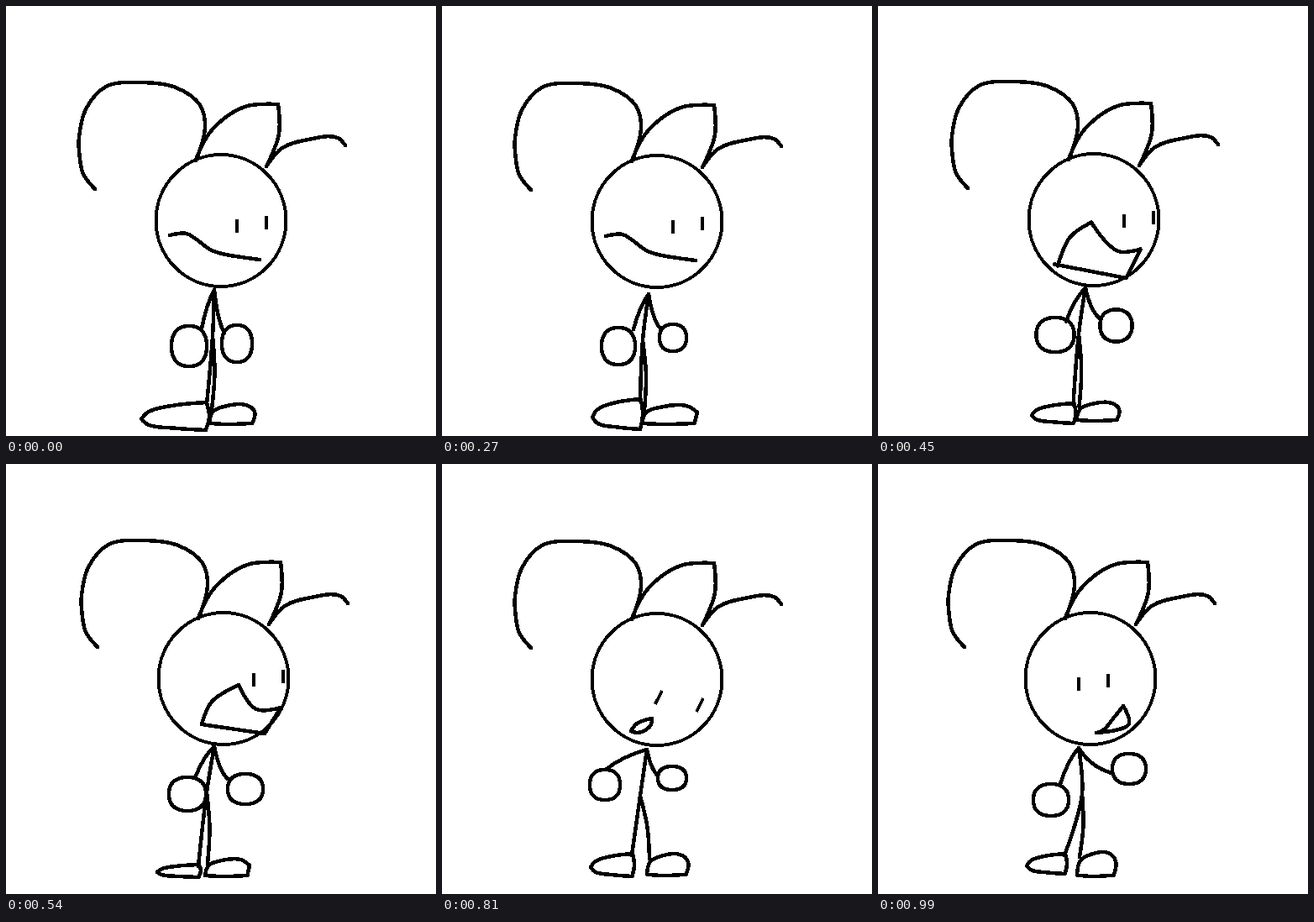
An HTML page for the animation above (1080 ms loop, 512 by 512 pixels).

```html
<!DOCTYPE html>
<html lang="en">
<head>
<meta charset="utf-8">
<title>Talking stick figure</title>
<style>
html, body { margin: 0; width: 100%; height: 100%; overflow: hidden; background: #fff; }
svg { display: block; width: 100vw; height: 100vh; }
</style>
</head>
<body>
<svg viewBox="0 0 512 512" fill="none" stroke="#000" stroke-width="4.5"
  stroke-linecap="round" stroke-linejoin="round" shape-rendering="crispEdges">
  <g id="head">
    <ellipse cx="256" cy="255.5" rx="77.5" ry="78.5" stroke-width="4"/>
    <path id="hair"/>
    <path id="eyes" stroke-width="4" stroke-linecap="butt"/>
    <path id="mouth"/>
  </g>
  <path id="body"/>
</svg>
<script>
const STEP = 90, STEPS = 12;
const HEAD = [[0, 0], [0, 0], [0, 1], [0, 1], [0, -3], [1, -1],
              [3, 0], [1, 0], [0, 0], [0, 1], [-6, 0], [-3, 0]];

const HAIR = [
  [106, 218, 92, 200, 87, 172, 87, 156, 95, 123, 119, 96, 158, 91, 202, 97, 231, 118, 237, 145, 226, 184],
  [226, 183, 244, 149, 284, 120, 324, 117, 325, 152, 310, 191],
  [310, 191, 329, 169, 360, 159, 395, 157, 404, 166]
];
const LIDS = [[192, 245, 217, 260, 244, 256, 252, 230], [291, 211, 295, 236, 318, 243, 328, 218]];

// Foot outlines inside a unit box
const FOOT_L = [0, .6, .1, .35, .45, .12, .96, 0, 1, .5, .95, 1, .5, .93, .1, .8];
const FOOT_R = [.08, .35, .3, .1, .8, 0, 1, .35, .95, .95, .4, 1, 0, .95];

const FLAT = [195, 273, 215, 271, 224, 276, 245, 291, 262, 296, 280, 299, 302, 302];

// spine: neck x, y, hip x; hands: centre and radii; feet: left, top, right, bottom
// eyes (in the head): left eye, offset of the right eye, lean
const POSES = [
  { step: 0, spine: [248, 338, 246], wristL: [233, 384], wristR: [260, 389],
    handL: [218, 405, 21, 24], handR: [275, 402, 18, 22],
    footL: [161, 472, 242, 505], footR: [242, 475, 296, 498],
    eyes: [275, 262, 35, -4, 0], mouth: FLAT },
  { step: 3, spine: [246, 343, 239], wristL: [228, 385], wristR: [260, 384],
    handL: [210, 405, 20, 22], handR: [275, 395, 16, 16],
    footL: [179, 468, 239, 504], footR: [238, 476, 304, 498],
    eyes: [275, 262, 35, -4, 0], mouth: FLAT },
  { step: 4, shut: true, spine: [246, 335, 239], wristL: [223, 377], wristR: [264, 369],
    handL: [206, 390, 23, 21], handR: [282, 374, 17, 20],
    footL: [186, 469, 239, 502], footR: [236, 474, 284, 497],
    eyes: [292, 257, 35, -4, 0],
    mouth: [196, 311, 213, 270, 232, 254, 275, 294, 299, 291, 284, 329, 188, 307] },
  { step: 6, spine: [248, 336, 239], wristL: [225, 374], wristR: [264, 375],
    handL: [216, 393, 22, 20], handR: [285, 387, 21, 18],
    footL: [180, 477, 232, 492], footR: [237, 471, 290, 491],
    eyes: [292, 257, 35, -4, 0],
    mouth: [230, 310, 242, 283, 274, 263, 295, 292, 324, 290, 305, 321, 230, 310] },
  { step: 7, spine: [245, 342, 239], wristL: [229, 375], wristR: [262, 375],
    handL: [212, 394, 21, 20], handR: [279, 386, 21, 18],
    footL: [173, 472, 230, 493], footR: [237, 469, 284, 490],
    eyes: [290, 257, 35, -4, 0],
    mouth: [228, 304, 237, 281, 263, 268, 281, 283, 315, 301, 303, 324, 228, 304] },
  { step: 9, spine: [244, 340, 236], wristL: [196, 363], wristR: [257, 371],
    handL: [194, 382, 18, 18], handR: [274, 374, 17, 14],
    footL: [177, 464, 229, 491], footR: [244, 465, 293, 490],
    eyes: [258, 277, 49, 9, 4],
    mouth: [225, 317, 232, 308, 250, 302, 249, 309, 242, 316, 233, 319, 225, 317] },
  { step: 11, spine: [239, 338, 243], wristL: [217, 381], wristR: [278, 368],
    handL: [206, 400, 21, 19], handR: [299, 363, 20, 18],
    footL: [177, 464, 225, 488], footR: [237, 463, 283, 491],
    eyes: [242, 262, 35, -4, 0],
    mouth: [263, 320, 271, 317, 283, 303, 295, 288, 302, 309, 298, 313, 263, 320] }
];

const sub = (a, b) => [a[0] - b[0], a[1] - b[1]];
const unit = v => { const l = Math.hypot(...v) || 1; return [v[0] / l, v[1] / l]; };
const lerp = (a, b, k) => a + (b - a) * k;

// Smooth stroke through x, y pairs; sharp turns stay corners
function curve(flat, closed) {
  const n = flat.length / 2;
  const at = i => {
    const m = closed ? (i + n) % n : Math.max(0, Math.min(n - 1, i));
    return [flat[2 * m], flat[2 * m + 1]];
  };
  const tangent = i => {
    const a = unit(sub(at(i), at(i - 1))), b = unit(sub(at(i + 1), at(i)));
    return a[0] * b[0] + a[1] * b[1] < 0.4 ? [0, 0] : unit([a[0] + b[0], a[1] + b[1]]);
  };
  let d = 'M' + at(0);
  for (let i = 0; i < (closed ? n : n - 1); i++) {
    const p = at(i), q = at(i + 1), s = tangent(i), e = tangent(i + 1);
    const h = Math.hypot(...sub(q, p)) / 3;
    d += `C${p[0] + s[0] * h} ${p[1] + s[1] * h} ${q[0] - e[0] * h} ${q[1] - e[1] * h} ${q}`;
  }
  return d + (closed ? 'Z' : '');
}

// Slightly squared ellipse
function hand([cx, cy, rx, ry]) {
  const soft = v => Math.sign(v) * Math.abs(v) ** 0.85;
  const pts = [];
  for (let i = 0; i < 16; i++) {
    const a = (i + 0.5) * Math.PI / 8;
    pts.push(cx + rx * soft(Math.cos(a)), cy + ry * soft(Math.sin(a)));
  }
  return curve(pts, true);
}

const foot = (shape, box) =>
  curve(shape.map((v, i) => lerp(box[i % 2], box[2 + i % 2], v)), true);

const arm = ([x, y], wrist, kx, ky) =>
  `M${x} ${y}Q${lerp(x, wrist[0], kx)} ${lerp(y, wrist[1], ky)} ${wrist}`;

function body({ spine, wristL, wristR, handL, handR, footL, footR }) {
  const [x, y, hipX] = spine, hipY = y + 55;
  const ankleL = [footL[2] - 3, footL[1] + 2];
  const ankleR = [footR[0] + 3, footR[1] + 5];
  const knee = [(hipX + ankleR[0]) / 2 + 3, (hipY + ankleR[1]) / 2];
  return arm(spine, wristL, 0.6, 0.35) + arm(spine, wristR, 0.35, 0.75) +
    curve([x, y, hipX, hipY, ...ankleL]) + curve([hipX, hipY, ...knee, ...ankleR]) +
    hand(handL) + hand(handR) + foot(FOOT_L, footL) + foot(FOOT_R, footR);
}

function eyes([x, y, dx, dy, lean]) {
  const eye = (cx, cy) => `M${cx + lean} ${cy - 8}L${cx - lean} ${cy + 8}`;
  return eye(x, y) + eye(x + dx, y + dy);
}

function poseAt(step) {
  const a = POSES.findLast(p => p.step <= step);
  const b = POSES.find(p => p.step >= step);
  if (a === b) return a;
  const k = (step - a.step) / (b.step - a.step), pose = {};
  for (const part in b) {
    if (Array.isArray(b[part])) pose[part] = a[part].map((v, i) => lerp(v, b[part][i], k));
  }
  return pose;
}

const el = id => document.getElementById(id);
const setPath = (id, d) => el(id).setAttribute('d', d);
const strokes = lines => lines.map(line => curve(line)).join('');

function draw(step) {
  const pose = poseAt(step);
  el('head').setAttribute('transform', `translate(${HEAD[step]})`);
  setPath('eyes', pose.shut ? strokes(LIDS) : eyes(pose.eyes));
  setPath('mouth', curve(pose.mouth));
  setPath('body', body(pose));
}

function tick() {
  draw(Math.floor(performance.now() / STEP) % STEPS);
  requestAnimationFrame(tick);
}

setPath('hair', strokes(HAIR));
tick();
</script>
</body>
</html>
```
